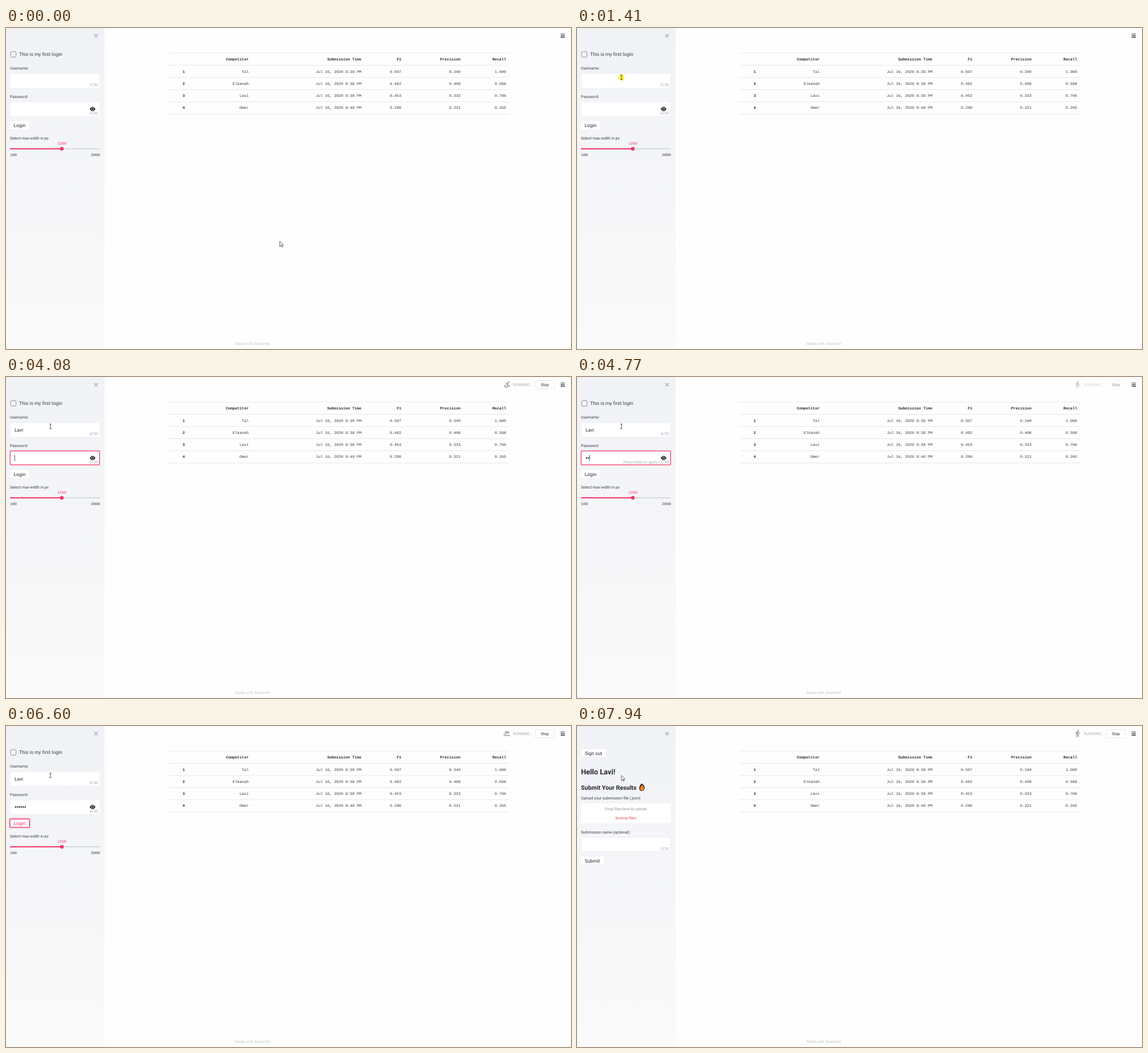
These frames come from a looping animation (992 by 564 pixels, 8 s). An HTML page:

```html
<!DOCTYPE html>
<html lang="en">
<head>
<meta charset="utf-8">
<title>Login to leaderboard</title>
<style>
  html, body { margin: 0; width: 100%; height: 100%; overflow: hidden; background: #fefefe; }
  svg { display: block; width: 992px; height: 564px; }
  text { font-family: Roboto, "Open Sans", sans-serif; font-size: 6.8px; fill: #3b3d47; text-rendering: geometricPrecision; white-space: pre; }
  .body { font-size: 8.5px; }
  .button { font-size: 8.4px; fill: #262730; }
  .mono { font-family: "Liberation Mono", "DejaVu Sans Mono", monospace; font-size: 6.67px; fill: #33353f; }
  .strong { font-weight: 700; fill: #262730; }
  .end { text-anchor: end; }
  .mid { text-anchor: middle; }
  .hint { fill: #a3a8b4; }
</style>
</head>
<body>
<svg id="stage" viewBox="0 0 992 564"></svg>
<script>
const LOOP = 8000;
const PINK = '#f63366';
const USER = 'Lavi';
const stage = document.getElementById('stage');

const text = (x, y, value, cls = '', extra = '') =>
  `<text x="${x}" y="${y}" class="${cls}" ${extra}>${value}</text>`;
const box = (x, y, w, h, extra = 'fill="#fff"') =>
  `<rect x="${x}" y="${y}" width="${w}" height="${h}" rx="1.5" ${extra}/>`;
const line = (x1, y1, x2, y2, color, width = 1) =>
  `<path d="M${x1} ${y1}L${x2} ${y2}" stroke="${color}" stroke-width="${width}"/>`;
const focusBox = (id, y) =>
  box(7.2, y, 157.2, 24.6, `id="${id}" fill="none" stroke="${PINK}" stroke-width="1.2"`);

// Leaderboard
const columns = [314, 426, 624, 694, 798, 878];
const rows = [
  ['', 'Competitor', 'Submission Time', 'F1', 'Precision', 'Recall'],
  ['1', 'Tal', 'Jul 16, 2020 8:39 PM', '0.507', '0.340', '1.000'],
  ['2', 'Elkanah', 'Jul 16, 2020 8:38 PM', '0.482', '0.408', '0.588'],
  ['3', USER, 'Jul 16, 2020 8:38 PM', '0.453', '0.333', '0.706'],
  ['4', 'Omer', 'Jul 16, 2020 8:40 PM', '0.290', '0.321', '0.265']
];
const table = () => {
  let out = line(285, 44, 884, 44, '#e2e4e8', 0.8);
  rows.forEach((row, r) => {
    const y = 57.2 + r * 21.3;
    row.forEach((cell, c) => {
      out += text(columns[c], y, cell, 'mono end' + (r && c ? '' : ' strong'));
    });
    const edge = 65.5 + r * 21.4;
    out += line(285, edge, 884, edge, '#dfe1e5', 0.8);
  });
  return out;
};

const loginPanel = () => `<g id="login">
  ${box(8.2, 41.7, 9.4, 9.4, 'fill="#f6f7f9" stroke="#8a8d98"')}
  ${text(23, 49.4, 'This is my first login', 'body')}
  ${text(7, 73.2, 'Username:')}
  ${box(8, 81, 156, 24)}
  ${focusBox('userFocus', 80.4)}
  ${text(15, 95.6, '', 'button', 'id="userText"')}
  ${text(161.3, 102.3, '', 'hint end', 'id="userHint"')}
  ${text(7, 122.9, 'Password:')}
  ${box(8, 130.4, 156, 24)}
  ${focusBox('passFocus', 129.8)}
  <g id="dots"></g>
  <path d="M147 142.3Q152 134.6 157 142.3Q152 150 147 142.3Z" fill="#1c1d24"/>
  <circle cx="152" cy="142.3" r="2" fill="#1c1d24" stroke="#fff" stroke-width=".8"/>
  ${text(161.3, 151.9, '', 'hint end', 'id="passHint"')}
  ${box(7, 163.4, 34, 14.6)}
  <g id="loginFocus">
    ${box(6.6, 163, 34.8, 15.4, `fill="none" stroke="${PINK}" stroke-opacity=".5" stroke-width="2.4"`)}
    ${box(7, 163.4, 34, 14.6, `fill="none" stroke="${PINK}" stroke-width=".8"`)}
  </g>
  ${text(23.8, 173.6, 'Login', 'button mid', 'id="loginText"')}
  ${text(7, 195.8, 'Select max-width in px')}
  ${text(98, 205.2, '1200', 'mono mid', `style="fill:${PINK}"`)}
  ${line(7, 212.3, 165, 212.3, '#d5d7de', 2)}
  ${line(7, 212.3, 98, 212.3, PINK, 2)}
  <circle cx="98" cy="212.3" r="3.2" fill="${PINK}"/>
  ${text(7, 225, '100', 'mono')}
  ${text(165, 225, '2000', 'mono end')}
  <path id="caret" stroke="#262730" stroke-width=".8"/>
</g>`;

const submitPanel = () => `<g id="submit">
  ${box(7, 40.6, 44, 14)}
  ${text(29, 50.6, 'Sign out', 'button mid')}
  ${text(7, 84.5, `Hello ${USER}!`, 'strong', 'style="font-size:12.8px"')}
  ${text(7, 111.6, 'Submit Your Results', 'strong', 'style="font-size:10.65px"')}
  <path d="M113 101C117 102 119.5 106 118.6 110Q117.5 114 114 114Q109.6 114 109.3 110C109 106 111 104 113 101Z" fill="#4a3028"/>
  <path d="M114 103.4C117 105 118 108 117.4 110.5Q116.5 113.3 114 113.3Q110.8 113 110.9 109.6C111 107 113.2 106 114 103.4Z" fill="#f0851f"/>
  ${text(7, 129.2, 'Upload your submission file (.json)')}
  ${box(7, 136, 158, 34.6)}
  ${text(85.8, 148.1, 'Drop files here to upload', 'mid', 'style="fill:#8d909b"')}
  ${text(85.8, 163.7, 'browse files', 'mid', 'style="fill:#e8414f"')}
  ${text(7, 188.5, 'Submission name (optional):')}
  ${box(7.5, 195.8, 157, 24.6, 'fill="#fff" stroke="#eceef2" stroke-width=".8"')}
  ${text(161.3, 217.6, '0/30', 'hint end')}
  ${box(7, 229.6, 40, 14)}
  ${text(27, 239.6, 'Submit', 'button mid')}
</g>`;

const header = () => `
  <path d="M155.2 10.7l5.6 5.6m0-5.6l-5.6 5.6" stroke="#a9adb8" stroke-width="1.5"/>
  <path d="M973.8 10.8h7.4m-7.4 2.8h7.4m-7.4 2.8h7.4" stroke="#262730" stroke-width="1.1"/>
  <g id="status">
    <g transform="translate(872.4 6.3) scale(.57)">
      <circle id="head" r="2.1" fill="#808495"/>
      <path id="figure" fill="none" stroke="#808495" stroke-width="2"/>
    </g>
    ${text(890, 16.1, 'RUNNING...', '', 'style="font-size:6.9px;fill:#aaadb7"')}
    ${box(929.5, 6.4, 33.6, 14.2, 'fill="#fff" stroke="#e4e5ea" stroke-width=".9"')}
    ${text(946.2, 15.9, 'Stop', 'mid', 'style="fill:#262730"')}
  </g>`;

stage.innerHTML = `
  <defs><linearGradient id="shade" x2="0" y2="1">
    <stop stop-color="#f0f2f6"/><stop offset="1" stop-color="#fafafa"/>
  </linearGradient></defs>
  <rect width="992" height="564" fill="#fefefe"/>
  <rect width="173" height="564" fill="url(#shade)"/>
  ${table()}${loginPanel()}${submitPanel()}${header()}
  ${text(403, 556.8, 'Made with Streamlit', '', 'style="fill:#c0c6cf"')}
  <circle id="click" cx="78" cy="86.8" r="5.6" fill="#f5f52a"/>
  <g id="pointer">
    <path id="arrow" d="M0 0V9L2.1 7.1L3.6 10.2L5 9.5L3.6 6.5H6.3Z" fill="#fff" stroke="#333" stroke-width=".8"/>
    <path id="beam" d="M-2-4H-.5L0-3.5L.5-4H2M0-3.5V3.5M-2 4H-.5L0 3.5L.5 4H2" fill="none" stroke="#333" stroke-width=".9"/>
  </g>`;

const el = {};
stage.querySelectorAll('[id]').forEach(node => { el[node.id] = node; });
const show = (node, on) => { node.style.display = on ? '' : 'none'; };
const ramp = (t, from, to) => Math.min(1, Math.max(0, (t - from) / (to - from)));
const countPast = (times, t) => times.filter(time => t >= time).length;

// Activity figures on a 24-unit grid: head position, then limbs
const figures = [
  [18, 4, 'M9 10L11 8H16L12.5 14.5H19V21M10 13A4 4 0 1 0 14 17'],
  [15.5, 3.5, 'M12 19V13.5L8.5 10L12 6.5L15 10H19M1 17a4 4 0 1 0 8 0a4 4 0 1 0-8 0M15 17a4 4 0 1 0 8 0a4 4 0 1 0-8 0'],
  [17, 8, 'M3 14L12 11L8 7L12 5L17 13M2 18q2.5-2 5 0t5 0t5 0t5 0'],
  [13.5, 3.5, 'M7 13V9L11.5 7L14 10.5L19 12M11.5 7L8 23M10.5 13L14 16V23'],
  [15, 3.5, 'M13 7L10 14L18 17M12 9L17 12L4 18M2 21H22'],
  [13.5, 3.5, 'M6 13V9L11.5 7L14 10.5L19 12M11.5 7L10 14L14 16.5V23M10.5 13L9 20L3 18.8']
];

const CLICK = 1470, TAB = 3830, BLUR = 6030, PRESS = 6550, SIGNED_IN = 7400;
const userKeys = [2620, 2900, 3180, 3370];
const passKeys = [4480, 4700, 4900, 5260, 5330, 5410];

const hint = (count, focused) =>
  (focused && count ? 'Press Enter to apply • ' : '') + count + '/30';

function drawPointer(t) {
  const p = ramp(t, 410, 1230);
  const ease = p * p * (3 - 2 * p);
  const x = 480.7 - 402.7 * ease;
  const y = 374.8 - 288 * ease;
  const overInput = x < 164 && ((y > 81 && y < 105) || (y > 130 && y < 154));
  const beam = overInput && t < SIGNED_IN;
  el.pointer.setAttribute('transform', `translate(${x} ${y})`);
  show(el.beam, beam);
  show(el.arrow, !beam);
  show(el.click, t >= 1390 && t < 1570);
  el.click.style.opacity = 0.85 * (1 - ramp(t, 1460, 1570));
}

function drawForm(t) {
  const userOn = t >= CLICK && t < TAB;
  const passOn = t >= TAB && t < BLUR;
  const typed = countPast(userKeys, t);
  const dots = countPast(passKeys, t);

  el.userText.textContent = USER.slice(0, typed);
  el.userHint.textContent = hint(typed, userOn);
  el.passHint.textContent = hint(dots, passOn);
  show(el.userFocus, userOn);
  show(el.passFocus, passOn);
  el.dots.innerHTML = Array.from({ length: dots }, (_, i) =>
    `<circle cx="${16.8 + 3.4 * i}" cy="142.3" r="1.2" fill="#262730"/>`).join('');

  // The caret restarts its blink on every key
  const last = Math.max(...[CLICK, TAB, ...userKeys, ...passKeys].filter(k => k <= t), 0);
  const lit = (t - last) % 1020 < (last === TAB ? 500 : 510);
  show(el.caret, (userOn || passOn) && lit);
  const x = userOn ? 15.5 + (typed ? el.userText.getComputedTextLength() : 0) : 15.4 + 3.4 * dots;
  el.caret.setAttribute('d', `M${x} ${userOn ? 87 : 136.8}v10.8`);

  const pressed = ramp(t, PRESS - 10, PRESS + 50);
  el.loginFocus.style.opacity = pressed;
  el.loginText.style.fill = t >= PRESS ? PINK : '';
}

function drawStatus(t) {
  const first = t < 5500;
  el.status.style.opacity = first
    ? ramp(t, 3860, 4060) * (1 - ramp(t, 4650, 4900))
    : ramp(t, 6100, 6400);
  const step = first ? Math.floor((t - 60) / 200) + 4 : Math.floor((t - 140) / 200);
  const [x, y, limbs] = figures[(step + 6) % 6];
  el.head.setAttribute('cx', x);
  el.head.setAttribute('cy', y);
  el.figure.setAttribute('d', limbs);
}

function draw(t) {
  show(el.login, t < SIGNED_IN);
  show(el.submit, t >= SIGNED_IN);
  drawForm(t);
  drawStatus(t);
  drawPointer(t);
}

const start = performance.now();
function tick() {
  draw((performance.now() - start) % LOOP);
  requestAnimationFrame(tick);
}
tick();
</script>
</body>
</html>
```
